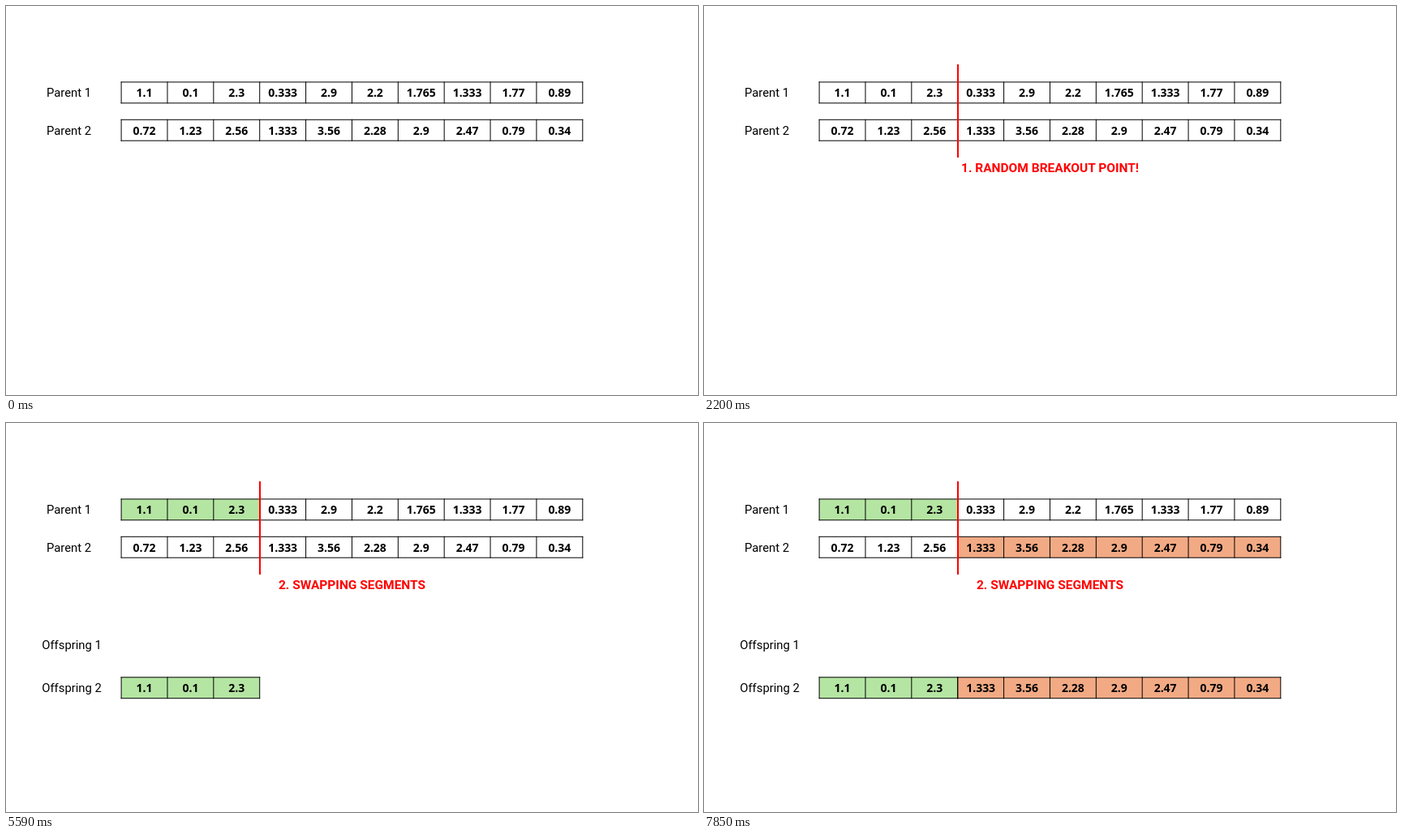
Animation, 853 px wide and 480 px high, one loop 8000 ms. Source, as an HTML page:

```html
<!DOCTYPE html>
<html lang="en">
<head>
<meta charset="utf-8">
<title>Single-point crossover</title>
<style>
  html, body { margin: 0; width: 100%; height: 100%; overflow: hidden; background: #fff; }
  svg { display: block; }
  .label { font: 14.8px Roboto, sans-serif; }
  .title { font: bold 15.5px Roboto, sans-serif; fill: #f00; text-anchor: middle; }
  .cell { font: bold 14px "Open Sans", sans-serif; text-anchor: middle; }
  .grid { fill: none; stroke: #000; stroke-width: 1; stroke-linecap: square; }
</style>
</head>
<body>
<svg id="stage" width="853" height="480" viewBox="0 0 853 480"></svg>
<script>
const LOOP = 8000, LEFT = 142.1, CELL = 56.87, HEIGHT = 25.9, CUT = 3;
const GREEN = "#b4e5a2", ORANGE = "#f2aa84";
const parent1 = [1.1, 0.1, 2.3, 0.333, 2.9, 2.2, 1.765, 1.333, 1.77, 0.89];
const parent2 = [0.72, 1.23, 2.56, 1.333, 3.56, 2.28, 2.9, 2.47, 0.79, 0.34];
const head = parent1.slice(0, CUT), tail = parent2.slice(CUT);
const rowY = { parent1: 93.9, parent2: 140.3, offspring2: 313.8 };

const columnX = i => LEFT + i * CELL;
const text = (kind, x, y, value) => `<text class="${kind}" x="${x}" y="${y}">${value}</text>`;

const fill = (y, first, count, color) =>
  `<rect x="${columnX(first)}" y="${y}" width="${count * CELL}" height="${HEIGHT}" fill="${color}"/>`;

function row(y, values, first = 0) {
  const last = first + values.length;
  let path = `M${columnX(first)} ${y}H${columnX(last)}M${columnX(first)} ${y + HEIGHT}H${columnX(last)}`;
  for (let i = first; i <= last; i++) path += `M${columnX(i)} ${y}v${HEIGHT}`;
  return `<path class="grid" d="${path}"/>` +
    values.map((v, i) => text("cell", columnX(first + i + 0.5), y + 18.2, v)).join("");
}

const during = (from, to, content) => `<g data-from="${from}" data-to="${to}">${content}</g>`;
const since = (from, content) => during(from, LOOP, content);

const stage = document.getElementById("stage");
stage.innerHTML = [
  since(4460, fill(rowY.parent1, 0, CUT, GREEN)),
  since(6720, fill(rowY.parent2, CUT, tail.length, ORANGE)),
  since(5590, fill(rowY.offspring2, 0, CUT, GREEN)),
  since(7850, fill(rowY.offspring2, CUT, tail.length, ORANGE)),
  text("label", 50, 112, "Parent 1") + row(rowY.parent1, parent1),
  text("label", 50, 159, "Parent 2") + row(rowY.parent2, parent2),
  during(1070, 3330, text("title", 426.5, 205, "1. RANDOM BREAKOUT POINT!")),
  since(3330, text("title", 426.5, 205, "2. SWAPPING SEGMENTS")),
  since(4460, text("label", 44.3, 279, "Offspring 1") + text("label", 44.3, 332, "Offspring 2")),
  since(5590, row(rowY.offspring2, head)),
  since(7850, row(rowY.offspring2, tail, CUT)),
  since(2200, `<path d="M313 72V187" stroke="#f00" stroke-width="2"/>`),
].join("");

const steps = [...stage.querySelectorAll("[data-from]")];
const start = performance.now();

function render() {
  const t = (performance.now() - start) % LOOP;
  for (const step of steps) {
    const { from, to } = step.dataset;
    step.style.display = t >= +from && t < +to ? "" : "none";
  }
  requestAnimationFrame(render);
}
render();
</script>
</body>
</html>
```
